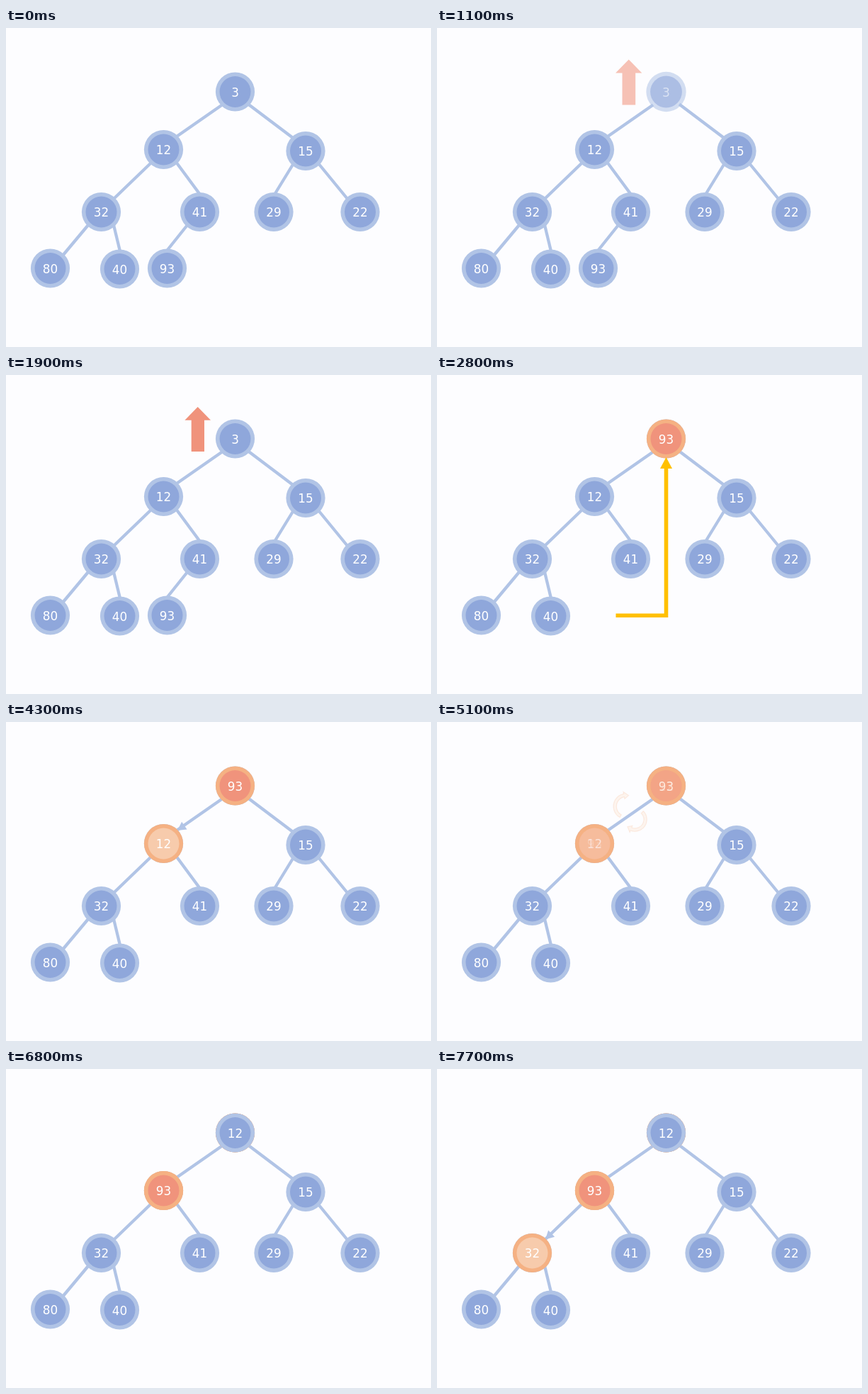
An HTML page with a canvas for the animation above (8000 ms loop, 600x450 px).

```html
<!DOCTYPE html>
<html lang="en">
<head>
<meta charset="utf-8">
<title>Heap: remove the minimum</title>
<style>
  html, body { margin: 0; width: 100%; height: 100%; overflow: hidden; background: #fdfdff; }
  canvas { display: block; }
</style>
</head>
<body>
<canvas id="stage" width="600" height="450"></canvas>
<script>
const ctx = document.getElementById('stage').getContext('2d');
const LOOP = 8000, STEP = 100;
const LINE = '#b1c4e6', RED = '#f0937c', ORANGE = '#f5b183', PEACH = '#f7cbac';
const STYLES = {
  blue: ['#8fa7db', LINE],
  red: [RED, ORANGE],
  peach: [PEACH, ORANGE]
};

// Later looks: [start, fade length, style, label]
const NODES = [
  { x: 323.5, y: 90, label: '3', pulse: true, looks: [
    [2700, 200, 'red', '93'], [5100, 500, 'peach', '12'], [6300, 200, 'blue', '12']] },
  { x: 222.5, y: 171.5, label: '12', looks: [
    [4300, 100, 'peach', '12'], [5100, 500, 'red', '93']] },
  { x: 423, y: 173.5, label: '15' },
  { x: 134.5, y: 259.5, label: '32', looks: [[7300, 500, 'peach', '32']] },
  { x: 273.5, y: 259.5, label: '41' },
  { x: 378, y: 259.5, label: '29' },
  { x: 500, y: 259.5, label: '22' },
  { x: 62.5, y: 339, label: '80' },
  { x: 160.5, y: 340, label: '40' },
  { x: 227.5, y: 339, label: '93', gone: [2700, 200], looks: [[2000, 100, 'red', '93']] }
];

const EDGES = [
  [305, 108.5, 241, 153], [342, 107.5, 405, 155], [205, 190, 152, 241],
  [240, 189, 274, 235], [406, 191, 379, 235], [441, 191, 482, 241],
  [116, 278, 80, 321], [152, 278, 161, 315]
];
const LAST_EDGE = [256, 278, 228, 313];

let now = 0;

const clamp = v => Math.max(0, Math.min(1, v));
const fade = (start, length = STEP) => clamp((now - start + STEP) / length);

function withAlpha(alpha, draw) {
  if (alpha <= 0) return;
  ctx.save();
  ctx.globalAlpha *= alpha;
  draw();
  ctx.restore();
}

function scaled(x, y, s, draw) {
  ctx.save();
  ctx.translate(x, y);
  ctx.scale(s, s);
  ctx.translate(-x, -y);
  draw();
  ctx.restore();
}

function polygon(points, color) {
  ctx.beginPath();
  points.forEach(([x, y]) => ctx.lineTo(x, y));
  ctx.closePath();
  ctx.fillStyle = color;
  ctx.fill();
}

function line(points, color, width) {
  ctx.beginPath();
  points.forEach(([x, y]) => ctx.lineTo(x, y));
  ctx.strokeStyle = color;
  ctx.lineWidth = width;
  ctx.stroke();
}

function edge([x1, y1, x2, y2]) {
  line([[x1, y1], [x2, y2]], LINE, 4.3);
}

function edgeHead(x, y, angle) {
  ctx.save();
  ctx.translate(x, y);
  ctx.rotate(angle);
  polygon([[0, 0], [-12, -6.5], [-12, 6.5]], LINE);
  ctx.restore();
}

function circle(x, y, r, color) {
  ctx.beginPath();
  ctx.arc(x, y, r, 0, Math.PI * 2);
  ctx.fillStyle = color;
  ctx.fill();
}

function disc(x, y, style, label) {
  const [fill, ring] = STYLES[style];
  circle(x, y, 27.6, ring);
  circle(x, y, 22, fill);
  ctx.fillStyle = '#fff';
  ctx.font = '16.8px "DejaVu Sans", sans-serif';
  ctx.textAlign = 'center';
  ctx.fillText(label, x, y + 6.8);
}

function node({ x, y, label, looks = [], gone }) {
  withAlpha(gone ? 1 - fade(...gone) : 1, () => {
    disc(x, y, 'blue', label);
    for (const [start, length, style, text] of looks) {
      withAlpha(fade(start, length), () => disc(x, y, style, text));
    }
  });
}

function upArrow() {
  polygon([[270.7, 45], [289, 63.8], [280, 63.8], [280, 108],
    [261.7, 108], [261.7, 63.8], [252.4, 63.8]], RED);
}

function moveArrow() {
  line([[252.5, 339.3], [323.5, 339.3], [323.5, 129]], '#ffc000', 5.6);
  polygon([[323.5, 116], [332, 132], [315, 132]], '#ffc000');
}

// Clockwise curved block arrow, angles in degrees
function curvedArrow(x, y, r, from, to) {
  const rad = Math.PI / 180, a = from * rad, b = to * rad, tip = (to + 24) * rad;
  const point = (radius, angle) =>
    ctx.lineTo(x + radius * Math.cos(angle), y + radius * Math.sin(angle));
  ctx.beginPath();
  ctx.arc(x, y, r + 2.2, a, b);
  point(r + 5, b);
  point(r, tip);
  point(r - 5, b);
  ctx.arc(x, y, r - 2.2, b, a, true);
  ctx.closePath();
  ctx.fillStyle = PEACH;
  ctx.fill();
  ctx.strokeStyle = ORANGE;
  ctx.lineWidth = 1.2;
  ctx.stroke();
}

// Half-transparent plateau with a small swell
function pulse() {
  const p = clamp((now - 1010) / 510);
  return {
    alpha: 1 - 0.5 * clamp(Math.min(p, 1 - p) / 0.2),
    size: 1 + 0.055 * (1 - Math.abs(2 * p - 1))
  };
}

function draw() {
  ctx.fillStyle = '#fdfdff';
  ctx.fillRect(0, 0, 600, 450);

  EDGES.forEach(edge);
  withAlpha(1 - fade(2700, 200), () => edge(LAST_EDGE));
  withAlpha(fade(4300) * (1 - fade(5100)),
    () => edgeHead(242, 153, Math.atan2(44.5, -64)));
  withAlpha(fade(7300, 500), () => edgeHead(153, 240.5, Math.atan2(51, -53)));

  const { alpha, size } = pulse();
  for (const n of NODES) {
    if (n.pulse) withAlpha(alpha, () => scaled(n.x, n.y, size, () => node(n)));
    else node(n);
  }

  withAlpha(fade(600) * (1 - fade(2000)) * alpha,
    () => scaled(270.7, 76.5, size, upArrow));
  withAlpha(fade(2000) * (1 - fade(3500, 200)), moveArrow);
  withAlpha(fade(5100, 500) * (1 - fade(6300, 200)), () => {
    curvedArrow(267, 119, 15.8, 120, 259);
    curvedArrow(279.5, 137.5, 14.6, -45, 112);
  });
}

const begin = performance.now();
function tick() {
  const t = (performance.now() - begin) % LOOP;
  now = Math.floor(t / STEP) * STEP;
  draw();
  requestAnimationFrame(tick);
}
tick();
</script>
</body>
</html>
```
